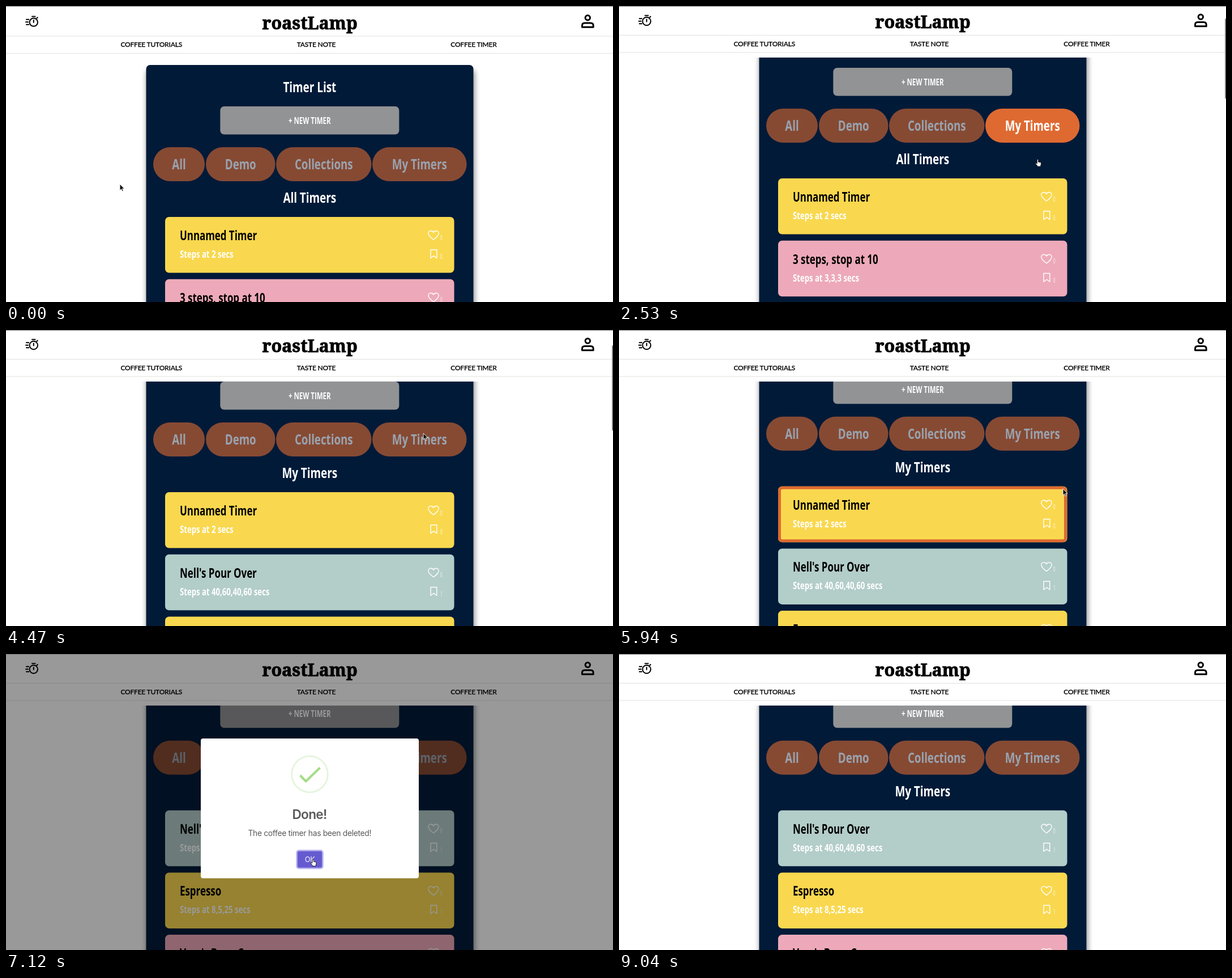
These frames come from a looping animation (1072x522 px, 9.49 s). An HTML page:

```html
<!DOCTYPE html>
<html lang="en">
<head>
<meta charset="utf-8">
<title>Timer list</title>
<style>
html, body { margin: 0; width: 100%; height: 100%; overflow: hidden; background: #fff; }
svg { display: block; width: 100vw; height: 100vh; }
.cond { font-family: "Open Sans", "Noto Sans", sans-serif; font-weight: 700; font-stretch: 75%; }
.thin { font-weight: 300; }
.mid { text-anchor: middle; }
.nav { font: 500 12px Lato, "Open Sans", sans-serif; letter-spacing: -.2px; stroke: #000; stroke-width: .25px; }
.brand { font: 900 30.5px "Noto Serif", "Liberation Serif", serif; stroke: #000; stroke-width: .9px; }
.ui { font-family: Inter, "Liberation Sans", sans-serif; }
.line { fill: none; stroke: #000; stroke-linecap: round; stroke-linejoin: round; }
</style>
</head>
<body>
<svg id="stage" viewBox="0 0 1072 522" preserveAspectRatio="none"></svg>
<script>
const stage = document.getElementById('stage');
const LOOP = 9490, STEPS = 64, STEP = LOOP / STEPS;
const NAVY = '#011a38', ORANGE = '#df6a31', YELLOW = '#f9d84f', PINK = '#eda9b9', TEAL = '#b3cdc9';

// One ratio brings the installed face to the condensed set width.
stage.innerHTML = '<text class="cond" id="probe" font-size="100">Unnamed Timer</text>';
const squeeze = 608 / document.getElementById('probe').getComputedTextLength();

const cond = (x, y, size, text, fill = '#fff', cls = '') =>
  `<text class="cond ${cls}" transform="translate(${x} ${y}) scale(${squeeze} 1)" font-size="${size}" fill="${fill}">${text}</text>`;
const box = (x, y, w, h, r, fill, more = '') =>
  `<rect x="${x}" y="${y}" width="${w}" height="${h}" rx="${r}" fill="${fill}" ${more}/>`;

// name, seconds, colour, bookmarks
const unnamed = ['Unnamed Timer', '2', YELLOW, 0];
const allTimers = [unnamed, ['3 steps, stop at 10', '3,3,3', PINK, 0]];
const myTimers = [
  unnamed,
  ["Nell's Pour Over", '40,60,40,60', TEAL, 1],
  ['Espresso', '8,5,25', YELLOW, 1],
  ["Vera's Brew Cup", '30,30,30', PINK, 0]
];

function card([name, secs, fill, marks], i, hover) {
  const border = hover ? box(283.5, 374.5, 505, 93.5, 5, 'none', `stroke="${ORANGE}" stroke-width="5"`) : '';
  const remove = hover ? `<circle cx="787" cy="374.3" r="11.2" fill="#cb2230"/>
    <path d="M779 374.3l4.6-5.6h10.6v11.2h-10.6z" fill="#fff"/>
    <path d="M785.4 371.8l5 5m0-5l-5 5" stroke="#cb2230" stroke-width="1.7"/>` : '';
  return `<g transform="translate(0 ${i * 109.7})">
    ${box(281, 372, 510.5, 98.5, 7, fill)}${border}
    ${cond(307, 413, 22.4, name, '#000')}
    ${cond(307, 444, 17.4, `Steps at ${secs} secs`)}
    <path d="M755 412C741 402 746 396.5 750.5 396.5C753 396.5 754.3 398 755 399.4C755.7 398 757 396.5 759.5 396.5C764 396.5 769 402 755 412Z
      M750 429.8H760.8V444.6L755.4 440.6L750 444.6Z" fill="none" stroke="#fff" stroke-width="1.4" stroke-linejoin="round"/>
    ${cond(767, 412.5, 12, 0, '#fff', 'thin')}${cond(767, 446, 12, marks, '#fff', 'thin')}
  </g>`;
}

const tabs = [['All', 260, 91], ['Demo', 353, 122.5], ['Collections', 477, 168.5], ['My Timers', 647, 166.5]]
  .map(([name, x, w]) => `<g class="tab" opacity=".6">${box(x, 249, w, 60, 30, ORANGE)}
    ${cond(x + w / 2, 288, 24.8, name, '#fff', 'mid')}</g>`).join('');

const header = `${box(0, 0, 1072, 92.5, 0, '#fff')}
  <path d="M0 53.2H1072M0 83.6H1072" stroke="#e1e1df"/>
  <text class="brand mid" x="536.5" y="40.5">roastLamp</text>
  <g class="nav mid"><text x="256.7" y="72.4">COFFEE TUTORIALS</text>
    <text x="548" y="72.4">TASTE NOTE</text><text x="826" y="72.4">COFFEE TIMER</text></g>
  <g class="line" stroke-width="2"><circle cx="48.8" cy="28.6" r="7.2"/>
    <path d="M46 18.4H51.6M48.8 25V29M54.3 21.6L55.8 20.2M36 23.8H40.2M35 28.3H39M36 32.8H40.2"/></g>
  <g class="line" stroke-width="3"><circle cx="1027.3" cy="20.8" r="4.2"/>
    <path d="M1017.5 37.3V34.5Q1017.5 30 1022 30H1032.6Q1037.2 30 1037.2 34.5V37.3Z"/></g>`;

const modal = `${box(344, 149, 385, 246.5, 4, '#fff')}
  <circle cx="536.5" cy="212" r="31.8" fill="none" stroke="#e4f5db" stroke-width="2.8"/>
  <path id="check" d="M519.5 214L529.5 224.5L554.5 200.5" pathLength="1" stroke-dasharray="1 2"
    fill="none" stroke="#a5dc86" stroke-width="4" stroke-linejoin="round"/>
  <g class="ui mid" fill="#595959">
    <text x="536" y="290.5" font-size="22.6" font-weight="600" letter-spacing="-.7">Done!</text>
    <text x="536.3" y="321" font-size="13.8" letter-spacing="-.3">The coffee timer has been deleted!</text>
  </g>
  ${box(512.3, 345.3, 48.4, 34, 5, '#b8b3ef')}${box(514.8, 347.8, 43.4, 29, 3, '#655bd0')}
  <text class="ui mid" x="536.7" y="366.7" font-size="12.6" fill="#fff">OK</text>`;

stage.innerHTML = `<defs><filter id="soft" x="-10%" y="-10%" width="120%" height="120%"><feGaussianBlur stdDeviation="4"/></filter></defs>
  ${box(0, 0, 1072, 522, 0, '#fff')}
  <g id="page">
    ${box(247, 112, 582, 700, 8, '#000', 'opacity=".36" filter="url(#soft)"')}
    ${box(247.5, 104, 578, 800, 7, NAVY)}
    ${cond(536.3, 152, 25, 'Timer List', '#fff', 'mid')}
    ${box(378.3, 177, 316, 49.5, 7, '#929395')}
    ${cond(536.3, 207.5, 15.2, '+ NEW TIMER', '#fff', 'mid')}
    ${tabs}<g id="list"></g>
  </g>
  <g id="header">${header}</g>
  ${box(1070.3, 4, 2.5, 150, 1.2, '#6d6d6d', 'id="thumb"')}
  ${box(0, 0, 1072, 522, 0, '#000', 'id="shade"')}
  <g id="modal">${modal}</g>
  ${box(0, 0, 1072, 1, 0, '#777')}
  <path id="arrow" d="M0 0V11.4L2.6 9L4.5 13L6.3 12.2L4.5 8.2H8Z" fill="#111" stroke="#fff" stroke-width=".9"/>
  <path id="hand" d="M2.8 1.2Q4 -.3 5 1.2V5L9 5.8Q10.2 6.2 10 8L9 13H4L.5 8.4Q0 6.8 1.4 6.8L2.8 8Z" fill="#fff" stroke="#111" stroke-width=".9"/>`;

const el = {};
for (const id of ['page', 'list', 'header', 'thumb', 'shade', 'modal', 'check', 'arrow', 'hand']) el[id] = document.getElementById(id);
const myTab = document.querySelectorAll('.tab')[3];

// Keys are [step, value...], linear in between.
const pointer = [
  [3, 201, 314], [4, 420, 272], [5, 760, 215], [6, 849, 198], [7, 849, 198],
  [8, 800, 228], [9, 750, 264], [10, 735.5, 270], [17, 735.5, 270],
  [18, 736, 226], [19, 737, 190], [20, 737, 182], [32, 737, 182],
  [33, 744, 196], [34, 758, 232], [35, 774, 266], [36, 780, 296], [37, 784, 284], [38, 784, 280],
  [42, 784, 280], [44, 690, 318], [46, 552, 357], [47, 538, 361], [52, 538, 361],
  [54, 600, 358], [55, 700, 352], [56, 786, 346], [57, 829, 342],
  [58, 858, 368], [59, 904, 414], [60, 962, 472], [61, 1004, 530]
];
const scrolling = [[16, 0], [17, 68], [20, 68], [21, 42], [22, 12], [23, 0], [24, 0], [25, 5], [28, 52], [30, 86], [32, 96.3]];

function at(keys, s) {
  const i = keys.findIndex(k => k[0] >= s);
  if (i < 0) return keys[keys.length - 1].slice(1);
  if (i === 0) return keys[0].slice(1);
  const a = keys[i - 1], b = keys[i], p = (s - a[0]) / (b[0] - a[0]);
  return a.slice(1).map((v, n) => v + (b[n + 1] - v) * p);
}
const within = (s, from, to) => s >= from && s < to;
const show = (node, on) => node.setAttribute('visibility', on ? 'visible' : 'hidden');

function draw(s) {
  const [x, y] = at(pointer, s), [scroll] = at(scrolling, s);
  const mine = s >= 20, deleted = s >= 41;
  const timers = !mine ? allTimers : deleted ? myTimers.slice(1) : myTimers;
  const hover = within(s, 36, 41) || within(s, 51, 57);

  el.page.setAttribute('transform', `translate(0 ${-scroll})`);
  el.header.setAttribute('transform', `translate(0 ${-Math.min(scroll, 1.6)})`);
  el.list.innerHTML = cond(536.3, 347, 25, mine ? 'My Timers' : 'All Timers', '#fff', 'mid') +
    timers.map((t, i) => card(t, i, hover && i === 0)).join('');
  myTab.setAttribute('opacity', within(s, 9, 22) || within(s, 32, 34) ? 1 : .6);

  show(el.thumb, within(s, 17, 34));
  el.thumb.setAttribute('y', 4 + scroll * .27);
  el.thumb.setAttribute('height', mine ? 150 : 141);
  el.thumb.setAttribute('opacity', s === 33 ? .5 : 1);

  const open = within(s, 41, 51), closing = s === 50;
  const size = closing ? .75 : s === 41 ? 1.03 : s === 42 ? .97 : 1;
  show(el.shade, open);
  show(el.modal, open);
  el.shade.setAttribute('opacity', closing ? .2 : .4);
  el.modal.setAttribute('opacity', closing ? .5 : 1);
  el.modal.setAttribute('transform', `translate(536.5 272) scale(${size}) translate(-536.5 -272)`);
  el.check.setAttribute('stroke-dashoffset', 1 - Math.max(0, Math.min(1, (s - 41) / 4)));

  const hand = within(s, 9, 22) || within(s, 32, 34) || within(s, 48, 51);
  for (const node of [el.arrow, el.hand]) node.setAttribute('transform', `translate(${x} ${y})`);
  show(el.hand, hand);
  show(el.arrow, !hand);
}

let last = -1;
function tick() {
  const t = performance.now() % LOOP;
  const s = Math.min(STEPS - 1, Math.floor((t + 8) / STEP));
  if (s !== last) draw(last = s);
  requestAnimationFrame(tick);
}
tick();
</script>
</body>
</html>
```
